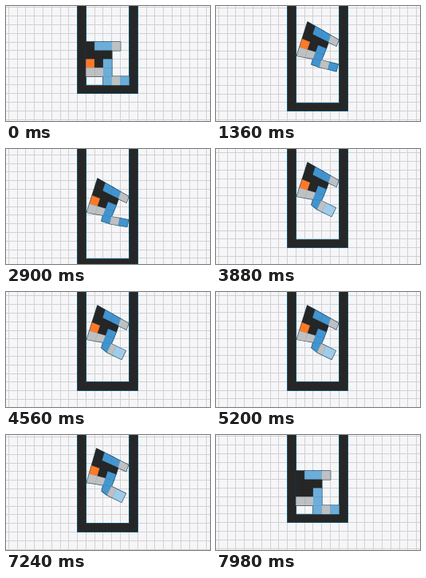
An HTML page with a canvas for the animation above (8000 ms loop, 256 by 144 pixels).

```html
<!DOCTYPE html>
<html lang="en">
<head>
<meta charset="utf-8">
<title>Soft climber</title>
<style>
  html, body { margin: 0; width: 100%; height: 100%; overflow: hidden; background: #f6f6f8; }
  canvas { display: block; width: 100%; height: 100%; }
</style>
</head>
<body>
<canvas id="stage" width="256" height="144"></canvas>
<script>
const ctx = document.getElementById('stage').getContext('2d');
const LOOP = 8000, STEP = 20, RESET = 7980;
const CELL = 10.8, LEFT = 100.4, RIGHT = LEFT + 5 * CELL;

const DARK = [38, 38, 38], GREY = [191, 192, 193], ORANGE = [255, 122, 40];
const BLUE = [108, 174, 217], DEEP = [65, 148, 207], PALE = [160, 204, 232];

// Body layout: d rigid, g soft, o and b actuators, f foot actuator
const BODY = ['dbbg', 'ddd', 'odb', 'ggb', '  bgf'];

// The body bends against the shaft, the foot turns (degrees) and widens
const REST = { t: 0, floor: 99, top: 99 - 5 * CELL, bend: 0, foot: 0, wide: 0 };
const KEYS = [
  REST,
  { t: 500, floor: 108, top: 31, bend: 1, foot: 14, wide: 0 },
  { t: 1360, floor: 121, top: 20, bend: 1, foot: 14, wide: 0 },
  { t: 2900, floor: 137, top: 37, bend: 1, foot: 10, wide: 0 },
  { t: 3880, floor: 113, top: 17, bend: 1, foot: 26, wide: 1 },
  { t: RESET, floor: 110.5, top: 17, bend: 0.9, foot: 26, wide: 1 }
];

const lerp = (a, b, k) => a + (b - a) * k;
const mix = (a, b, k) => a.map((v, i) => lerp(v, b[i], k));
const rgb = c => `rgb(${c.map(Math.round).join()})`;
const crisp = v => Math.floor(v) + 0.5;
const polar = (deg, len) => [len * Math.cos(deg * Math.PI / 180), len * Math.sin(deg * Math.PI / 180)];
const add = ([x, y], [u, v]) => [x + u, y + v];

function stateAt(t) {
  if (t >= RESET) return { ...REST, idle: true };
  const i = KEYS.findIndex(k => k.t > t);
  const a = KEYS[i - 1], b = KEYS[i];
  const u = (t - a.t) / (b.t - a.t), k = u * u * (3 - 2 * u);
  const s = {};
  for (const name in a) s[name] = lerp(a[name], b[name], k);
  return s;
}

// Corner of the body lattice; lower rows tilt less than upper ones
function corner(s, r, c) {
  const { bend, wide } = s;
  if (r === 5 && c === 2) return add(corner(s, 4, 2), [-2 * bend, CELL - 3.8 * bend]);
  if (r === 5) return add(corner(s, 4, c), polar(s.foot + 90, CELL - 1.8 * bend + 3 * wide));
  if (r === 4 && c > 3) {
    const reach = c === 4 ? CELL - 4 * wide : 2 * CELL - 1.5 * wide;
    return add(corner(s, 4, 3), polar(s.foot, reach));
  }
  const start = [LEFT + bend * (14.6 - 3.4 * r), s.top + r * (CELL - 0.2 * bend)];
  const tilt = bend * (30 - 3 * r - r * r / 2);
  return add(start, polar(tilt, c * (CELL + bend * (0.4 - 0.2 * r))));
}

function trace(pts) {
  ctx.beginPath();
  pts.forEach(([x, y]) => ctx.lineTo(x, y));
  ctx.closePath();
}

function drawWorld(floor) {
  ctx.fillStyle = '#f6f6f8';
  ctx.fillRect(0, 0, 256, 144);
  ctx.beginPath();
  for (let x = LEFT % CELL; x < 256; x += CELL) { ctx.moveTo(crisp(x), 0); ctx.lineTo(crisp(x), 144); }
  for (let y = floor % CELL; y < 144; y += CELL) { ctx.moveTo(0, crisp(y)); ctx.lineTo(256, crisp(y)); }
  ctx.strokeStyle = '#d0d1d2';
  ctx.lineWidth = 1;
  ctx.stroke();

  const [l, il, ir, r] = [LEFT - CELL, LEFT, RIGHT, RIGHT + CELL].map(crisp);
  const f = crisp(floor), base = crisp(floor + CELL);
  trace([[l, -5], [il, -5], [il, f], [ir, f], [ir, -5], [r, -5], [r, base], [l, base]]);
  ctx.fillStyle = rgb(DARK);
  ctx.fill();
  ctx.strokeStyle = '#14546f';
  ctx.stroke();
}

function drawBody(s) {
  const blue = mix(BLUE, DEEP, s.bend);
  const colours = {
    d: DARK, g: GREY, b: blue,
    o: s.idle ? DARK : ORANGE,
    f: mix(blue, PALE, s.wide)
  };
  const cells = [];
  BODY.forEach((row, r) => [...row].forEach((kind, c) => {
    if (kind === ' ') return;
    const pts = [[r, c], [r, c + 1], [r + 1, c + 1], [r + 1, c]].map(([i, j]) => corner(s, i, j));
    cells.push({ pts, colour: rgb(colours[kind]) });
  }));

  // Stroke everything first so that only the outer edge stays outlined
  ctx.lineJoin = 'round';
  ctx.strokeStyle = '#123f56';
  ctx.lineWidth = 1.4;
  cells.forEach(({ pts }) => { trace(pts); ctx.stroke(); });
  ctx.lineWidth = 0.3;
  cells.forEach(({ pts, colour }) => {
    trace(pts);
    ctx.fillStyle = ctx.strokeStyle = colour;
    ctx.fill();
    ctx.stroke();
  });
}

const start = performance.now();
function frame() {
  const t = Math.floor(((performance.now() - start) % LOOP) / STEP) * STEP;
  const s = stateAt(t);
  drawWorld(s.floor);
  drawBody(s);
  requestAnimationFrame(frame);
}
frame();
</script>
</body>
</html>
```
